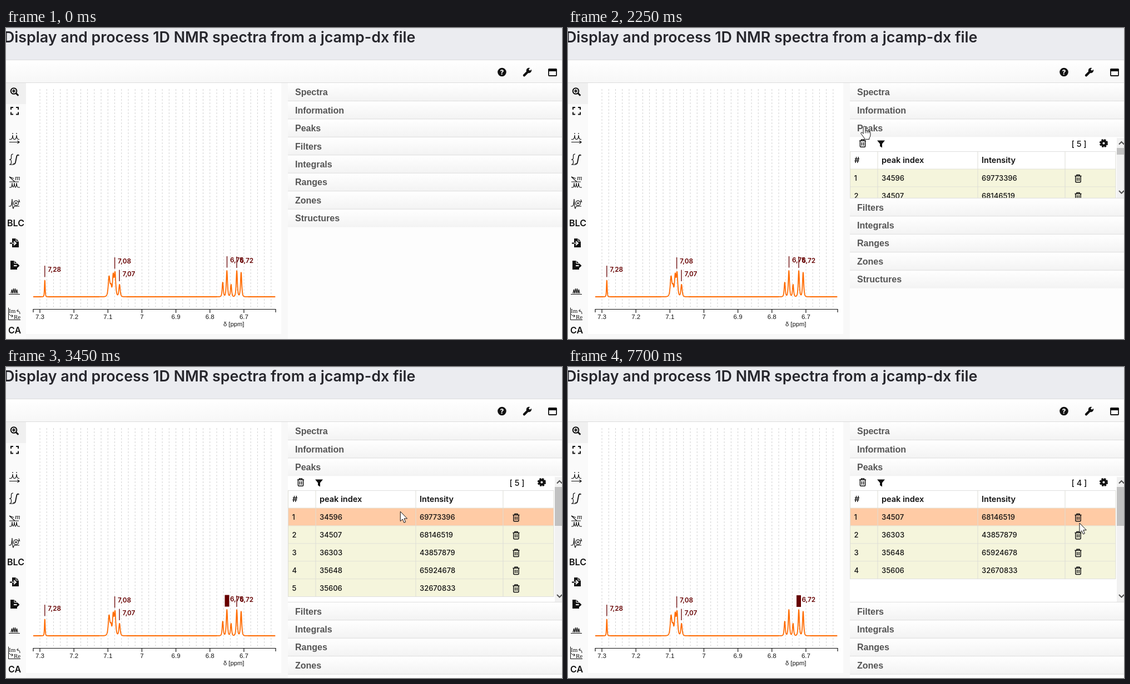
An HTML page for the animation above (8 s loop, 1000 by 560 pixels).

```html
<!DOCTYPE html>
<html lang="en">
<head>
<meta charset="utf-8">
<title>NMR spectrum viewer</title>
<style>
html, body { margin: 0; width: 100%; height: 100%; overflow: hidden; background: #fff; }
svg { display: block; width: 100vw; height: 100vh; }
text { font-family: Inter, "Open Sans", sans-serif; font-weight: 600; fill: #111; }
.head { font: bold 16px "Liberation Sans", Arial, sans-serif; fill: #555; }
.axis { font: 11.5px "Liberation Sans", Arial, sans-serif; text-anchor: middle; }
.unit { font: 11.2px "Liberation Sans", Arial, sans-serif; }
.peak { font-size: 11.7px; fill: #600; }
.th { font-size: 14.5px; }
.td { font-size: 13px; font-weight: 500; }
.count { font-size: 14.5px; font-weight: 500; }
.serif { font-family: "Liberation Serif", Times, serif; font-weight: 400; }
.line { fill: none; stroke: #111; stroke-width: 1.2; }
</style>
</head>
<body>
<svg viewBox="0 0 1000 560">
  <defs>
    <linearGradient id="bar" x2="0" y2="1">
      <stop offset="0" stop-color="#fff"/><stop offset="1" stop-color="#f3f3f3"/>
    </linearGradient>
    <linearGradient id="tools" x2="0" y2="1">
      <stop offset="0" stop-color="#fff"/><stop offset="1" stop-color="#f7f7f7"/>
    </linearGradient>
    <g id="trash" class="line" style="stroke-width:1.5">
      <path d="M-6-4.5H6M-2.5-4.8V-6.5H2.5V-4.8M-4.6-4.2V5.6Q-4.6 6.8-3.4 6.8H3.4Q4.6 6.8 4.6 5.6V-4.2M-1.6-1.8V4.2M1.6-1.8V4.2"/>
    </g>
    <clipPath id="clip"><rect id="clipBox" x="507" y="196" width="493"/></clipPath>
  </defs>

  <rect width="1000" height="560" fill="#fdfdfd"/>
  <rect width="1000" height="57" fill="#ebecf0"/>
  <rect width="1000" height="1" fill="#dcdde1"/>
  <text x="-4" y="25.5" font-size="26.8" style="fill:#26262c">Display and process 1D NMR spectra from a jcamp-dx file</text>
  <rect y="57" width="1000" height="41" fill="url(#tools)"/>
  <path d="M0 57.5H1000M0 98.5H1000" stroke="#dcdcdc"/>
  <rect y="99" width="36" height="461" fill="#fafafa"/>
  <rect y="99" width="36" height="38" fill="#f0f0f0"/>
  <rect x="36" y="99" width="471" height="461" fill="#f8f8f8"/>
  <rect x="36" y="99" width="459" height="452" fill="#fff"/>

  <!-- top right icons -->
  <circle cx="892" cy="79.5" r="7.8" fill="#111"/>
  <text x="892" y="84" font-size="12" text-anchor="middle" style="fill:#fff;font-weight:800">?</text>
  <path d="M932 85.3L938 79.3" stroke="#111" stroke-width="4.4" stroke-linecap="round"/>
  <circle cx="940.5" cy="76.5" r="4.7" fill="#111"/>
  <path d="M941.2 75.8L947 70" stroke="#fff" stroke-width="3.4"/>
  <path d="M976 75V85.2Q976 86 977 86H989Q990 86 990 85.2V75" fill="#fff" stroke="#111" stroke-width="1.8"/>
  <rect x="975" y="73" width="16" height="5" rx="1.5" fill="#111"/>

  <!-- left tools -->
  <circle cx="14" cy="113.5" r="5.3" class="line" style="stroke-width:2"/>
  <path d="M18 117.5L22.3 121.8" class="line" style="stroke-width:2.8"/>
  <path d="M11 113.5H17M14 110.5V116.5" class="line" style="stroke-width:1.8"/>
  <path d="M9 147V143H13M18 143H22V147M22 151.5V155.5H18M13 155.5H9V151.5" class="line" style="stroke-width:2"/>
  <path d="M6 200.5H9Q11.5 200 12 193 12.5 200 14.5 200.5H16Q18.5 200 19 193 19.5 200 22 200.5H24M6 205.5H23M20.5 203L24 205.5 20.5 208M12 189V191M19 189V191" class="line"/>
  <path d="M13 227Q9 227 9.5 231V234Q9.5 237 6 237 9.5 237 9.5 240V242Q9.5 246 6 246H14" class="line"/>
  <path d="M23.5 229.5Q20 227 19 232L17 242Q16 246 12.5 244.5" class="line" style="stroke-width:1.8"/>
  <text x="16" y="274" class="serif" font-size="13" font-style="italic" font-weight="700">m</text>
  <path d="M6 268L16 277M6 268L14 271M6 277H23M6 287H9Q11 286 11 279 11.5 286 13 286.5 14.5 286 15 279 15.5 287 17 287 18.5 286 19 279 19.5 287 22 287H25" class="line"/>
  <path d="M5 321H8Q10.5 320 11 308 11.5 324 13 325 14 321 16 321H24M23 309L24.5 313 21 312.5" class="line"/>
  <circle cx="18" cy="315.5" r="4.3" class="line"/><circle cx="18" cy="315.5" r="1.2" class="line"/>
  <text x="2" y="357" font-size="16">BLC</text>
  <path d="M11 379H18L23 384V395H11Z" fill="#111"/>
  <path d="M7 387.5H16" stroke="#111" stroke-width="2.2"/>
  <path d="M11 387.5H16M14 384L18 387.5 14 391" fill="none" stroke="#fff" stroke-width="1.7"/>
  <path d="M18 379V384H23" fill="none" stroke="#fff"/>
  <path d="M8 419H15L20 424V435H8Z" fill="#111"/>
  <path d="M14 428H20" stroke="#fff" stroke-width="2"/>
  <path d="M19 428H22M20.5 424.5L24 428 20.5 431.5Z" fill="#111" stroke="#111"/>
  <path d="M15 419V424H20" fill="none" stroke="#fff"/>
  <path d="M5 479.5H25M9 478L10.5 471 12 478 13.5 469 15 478 16.5 469 18 478 19.5 471 21 478" class="line"/>
  <path d="M4.5 503.5V525.5H26M6 515Q7 519 12 518.5M10 516L12.5 518.5 10 521M25 515Q25 509 20 509M22 506.5L19.5 509 22 511.5" class="line" style="stroke-width:1"/>
  <text x="5" y="513" class="serif" font-size="11">Im</text>
  <text x="14" y="524" class="serif" font-size="11">Re</text>
  <text x="4" y="549.5" font-size="16">CA</text>

  <g id="plot"></g>
  <g id="marks"></g>
  <g id="side"></g>
  <circle id="pulse" fill="#ffe500" fill-opacity=".75"/>
  <g id="cursor" fill="#fff" stroke="#111" stroke-linejoin="round">
    <path id="arrow" d="M0 0V17.5L4 13.8 6.6 20 9.4 18.8 6.8 12.7H12.3Z"/>
    <g id="hand" transform="translate(-.4 -.6)">
      <path d="M-2 13V1.5A1.9 1.9 0 0 1 1.8 1.5V7.5Q3.7 6.5 5 8.1 6.8 7.3 8.1 9 10.8 8.8 10.8 11.2V15.5Q10.8 18.5 8.8 20.5V23H0V21Q-3 17-6 13 -6.8 11-5 10.4 -3.5 10.4-2 13Z"/>
      <path d="M1.8 7.5V12M5 8.1V12M8.1 9V12" fill="none"/>
    </g>
  </g>
</svg>
<script>
const $ = id => document.getElementById(id);
const LOOP = 8000;
const heads = ['Spectra', 'Information', 'Peaks', 'Filters', 'Integrals', 'Ranges', 'Zones', 'Structures'];
const rows = [[34596, 69773396], [34507, 68146519], [36303, 43857879], [35648, 65924678], [35606, 32670833]];
// x, top, label, table row
const marks = [
  [69.8, 428, '7,28', 2], [195.6, 413, '7,08', 3], [204, 435.5, '7,07', 4],
  [397.5, 411, '6,75', 0], [415, 411.5, '6,72', 1]
];
// centre, height, width
const peaks = [
  [69.8, 30, 1.1], [185.4, 36, 2.7], [188.8, 16, 2.1], [192.8, 37, 2.3], [196.1, 41, 2.3], [204.2, 22, 2.1],
  [389.8, 26, 1.8], [397.3, 47, 1.9], [404.8, 22, 1.8], [415.1, 47, 1.9], [422.9, 44, 1.9]
];
// start, time per step, steps, Bezier control points
const moves = [
  [460, 80, 11, [[848, 529], [520, 440], [424, 200], [526, 179]]],
  [1320, 170, 2, [[532, 178.5], [533, 178], [533, 178], [533.5, 178]]],
  [2980, 78, 11, [[540, 184], [590, 235], [728, 280], [881, 277]]],
  [3840, 83, 4, [[892, 278], [912, 279], [930, 280], [937, 280]]],
  [4240, 73, 4, [[935, 279], [930, 278], [924, 276], [921, 275]]],
  [4610, 80, 1, [[919.5, 275]]],
  [7620, 80, 2, [[919.5, 277], [920, 278], [920, 280], [920, 281]]]
];
// start, full size, end, x, y
const clicks = [[1790, 1870, 2020, 534, 178], [6260, 6260, 6510, 919, 274]];

const line = (x1, y1, x2, y2, c, extra = '') => `<path d="M${x1} ${y1}L${x2} ${y2}" stroke="${c}" ${extra}/>`;
const rect = (x, y, w, h, c) => `<rect x="${x}" y="${y}" width="${w}" height="${h}" fill="${c}"/>`;
const text = (x, y, cls, s) => `<text x="${x}" y="${y}" class="${cls}">${s}</text>`;
const icon = (x, y) => `<use href="#trash" x="${x}" y="${y}"/>`;

function drawPlot() {
  let s = '';
  for (let k = 0; k < 35; k++) {
    const x = 61 + k * 12.23;
    s += line(x, 110, x, 506, '#d2d2d2', 'stroke-dasharray="3 3"');
  }
  s += '<path d="M49 512V506.5H485V512" fill="none" stroke="#111" stroke-width="1.2"/>';
  for (let k = 0; k < 7; k++) {
    const x = 61 + k * 61.15;
    s += line(x, 506, x, 513, '#111', 'stroke-width="1.2"') + text(x, 524, 'axis', +(7.3 - k / 10).toFixed(1));
  }
  s += text(391, 537, 'unit', 'δ [ppm]');
  let d = '';
  for (let x = 49; x <= 484.5; x += .3) {
    const y = peaks.reduce((sum, [c, h, w]) => sum + h / (1 + ((x - c) / w) ** 2) ** 2, 0);
    d += `${d ? 'L' : 'M'}${x.toFixed(1)} ${(484 - y).toFixed(2)}`;
  }
  $('plot').innerHTML = s + `<path d="${d}" fill="none" stroke="#ff6a00" stroke-width="1.8" stroke-linejoin="round"/>`;
}

function bezier(p, u) {
  if (p.length < 2) return p[0];
  const v = 1 - u, w = [v * v * v, 3 * v * v * u, 3 * v * u * u, u * u * u];
  return [0, 1].map(i => p.reduce((sum, q, k) => sum + q[i] * w[k], 0));
}

function pointer(t) {
  const m = moves.filter(m => t >= m[0]).pop();
  if (!m) return null;
  const [start, dt, n, p] = m;
  return bezier(p, Math.min(n - 1, Math.floor((t - start) / dt)) / Math.max(1, n - 1));
}

const openHeight = t => t < 2250 ? 0 : t < 2340 ? 110 : t < 2430 ? 210 : 227;

function table(list, h, hot) {
  const end = 196 + h;
  let s = rect(507, 196, 493, h, '#fff');
  s += icon(530, 207.5) + '<path d="M556 202.5H570L565 208.5V215.5L561 213V208.5Z" fill="#111"/>';
  s += text(905.5, 213.5, 'count', `[ ${list.length} ]`);
  s += '<circle cx="963.5" cy="207.5" r="4" fill="none" stroke="#111" stroke-width="4"/>' +
    '<circle cx="963.5" cy="207.5" r="6.3" fill="none" stroke="#111" stroke-width="2.6" stroke-dasharray="3.2 1.748"/>';
  list.forEach((r, i) => {
    const y = 254 + i * 31.9;
    s += rect(507, y, 478, 31.9, i === hot ? '#ffcba5' : '#f5f5dc');
    s += line(507, y, 985, y, '#e2e2d6');
    s += text(514.5, y + 21, 'td', i + 1) + text(564, y + 21, 'td', r[0]) + text(744, y + 21, 'td', r[1]);
    s += icon(917.5, y + 17);
  });
  const bottom = 254 + list.length * 31.9;
  s += text(515, 243, 'th', '#') + text(564, 243, 'th', 'peak index') + text(744, 243, 'th', 'Intensity');
  s += line(507, 222.5, 985, 222.5, '#dedede') + line(507, bottom, 985, bottom, '#dedede');
  for (const x of [507.5, 557, 737, 894, 985]) s += line(x, 222, x, bottom, '#ddddd6');
  s += rect(987, 198, 13, h, '#f1f1f1') + rect(987, 216, 13, Math.max(12, 70 - (227 - h) * .7), '#c1c1c1');
  s += `<path d="M991 209.5L995.5 205 1000 209.5M991 ${end - 13}L995.5 ${end - 8.5} 1000 ${end - 13}" class="line" style="stroke:#505050;stroke-width:2"/>`;
  return `<g clip-path="url(#clip)">${s}</g>`;
}

function drawSide(list, h, hot) {
  const pitch = 32.45;
  let s = h ? table(list, h, hot) : '';
  heads.forEach((name, i) => {
    const y = 99 + i * pitch + (i > 2 ? h : 0);
    s += rect(507, y, 493, pitch, 'url(#bar)') + text(520, y + 22.2, 'head', name);
    if (i) s += line(507, y, 1000, y, '#dcdcdc');
  });
  $('clipBox').setAttribute('height', h);
  $('side').innerHTML = s;
}

function drawMarks(gone, hot) {
  $('marks').innerHTML = marks.filter(m => m[3] >= gone).map(([x, y, label, row]) =>
    (row - gone === hot ? rect(x - 4, y - .5, 8, 21, '#600') : line(x, y, x, y + 20.5, '#600', 'stroke-width="1.3"')) +
    text(x + 5.4, y + 11, 'peak', label)).join('');
}

let shown = '';
function render(t) {
  const p = pointer(t), h = openHeight(t), gone = t >= 6510 ? 1 : 0;
  const hot = p && h && t > 2980 && p[0] > 507 && p[1] >= 254 && p[1] < 286 ? 0 : -1;
  const state = [h, gone, hot].join();
  if (state !== shown) {
    shown = state;
    drawSide(rows.slice(gone), h, hot);
    drawMarks(gone, hot);
  }
  $('cursor').style.display = p ? '' : 'none';
  if (p) {
    const [x, y] = p;
    const onHead = x > 507 && y > 99 && y < (h ? 196 : 359);
    const onTrash = h && x > 911 && x < 925 && y > 262 && y < 279;
    $('cursor').setAttribute('transform', `translate(${x} ${y})`);
    $('hand').style.display = onHead || onTrash ? '' : 'none';
    $('arrow').style.display = onHead || onTrash ? 'none' : '';
  }
  const c = clicks.find(c => t >= c[0] && t < c[2]);
  $('pulse').setAttribute('r', c ? (t < c[1] ? 10 : 14) : 0);
  if (c) {
    $('pulse').setAttribute('cx', c[3]);
    $('pulse').setAttribute('cy', c[4]);
  }
}

drawPlot();
const begin = performance.now();
function tick() {
  render((performance.now() - begin) % LOOP);
  requestAnimationFrame(tick);
}
tick();
</script>
</body>
</html>
```
